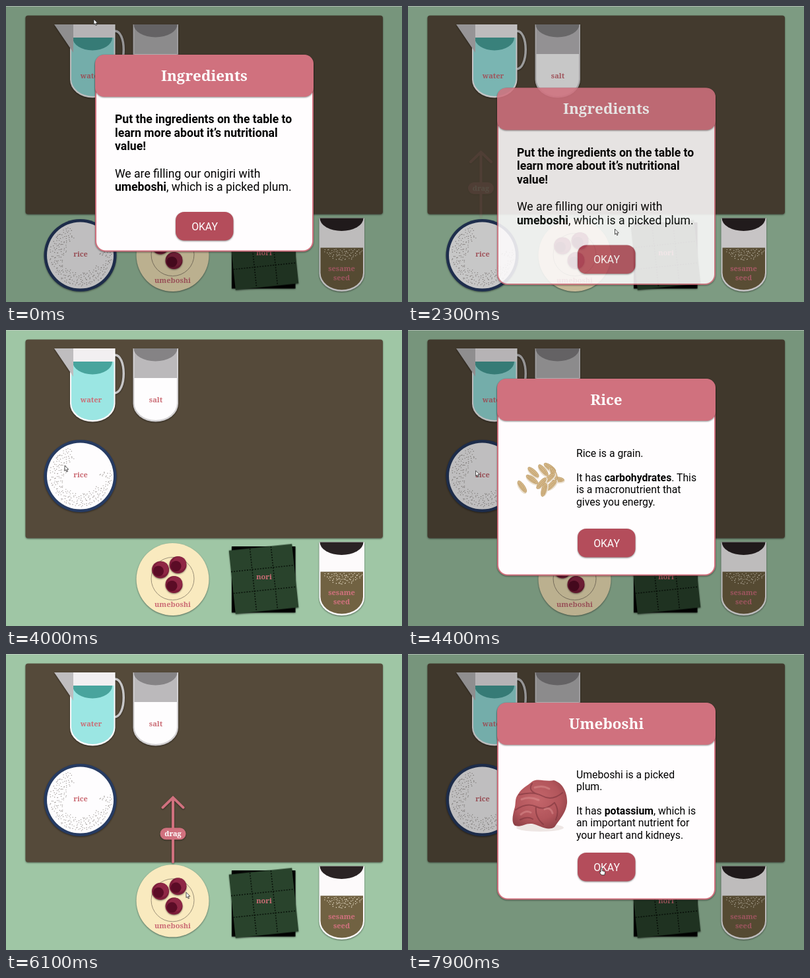
These frames come from a looping animation (600x450 px, 8 s). An HTML page:

```html
<!DOCTYPE html>
<html lang="en">
<head>
<meta charset="utf-8">
<title>Onigiri ingredients</title>
<style>
html, body { margin: 0; width: 100%; height: 100%; overflow: hidden; background: #9fc6a5; }
svg { display: block; width: 600px; height: 450px; }
text { font-family: Roboto, sans-serif; white-space: pre; }
.label { font: bold 11px "Noto Serif", serif; text-anchor: middle; fill: #cb6c75; }
.title { font: bold 22.4px "Noto Serif", serif; text-anchor: middle; fill: #fff; }
.okay { font-size: 15.75px; text-anchor: middle; fill: #fff; }
.shadow { filter: drop-shadow(0 1.5px 1px #0007); }
.bold { font-weight: bold; }
</style>
</head>
<body>
<svg id="stage" viewBox="0 0 600 450"></svg>
<script>
const LOOP = 8000, ROSE = '#d0717e', LIFT = 157;

let seed = 7;
const rand = () => (seed = seed * 16807 % 2147483647) / 2147483647;

const label = (x, y, s, fill = '') =>
  `<text class="label" x="${x}" y="${y}" ${fill && `style="fill:${fill}"`}>${s}</text>`;

// Jittered grid of specks, kept where inside(x, y) holds
function specks(x0, y0, x1, y1, step, color, inside) {
  let d = '';
  for (let y = y0; y < y1; y += step)
    for (let x = x0; x < x1; x += step) {
      const px = x + rand() * step, py = y + rand() * step;
      if (inside(px, py)) d += `M${px.toFixed(1)} ${py.toFixed(1)}h1.3`;
    }
  return `<path d="${d}" stroke="${color}" stroke-width="1.1"/>`;
}

// Round-bottomed glass: upper part, content from `level` down, surface ellipse
function glass(x, y, o) {
  return `<g class="shadow" transform="translate(${x} ${y})">${o.back || ''}
    <path d="M0 0H68.5V84A34.25 27.5 0 0 1 0 84Z" fill="${o.rim}"/>
    <path d="M2 0H66.5V${o.level}H2Z" fill="${o.top}"/>
    <path d="M2 ${o.level}H66.5V83A32.25 26 0 0 1 2 83Z" fill="${o.fill}"/>
    <path d="M${o.inset} ${o.surfaceY}H${68 - o.inset}A${34 - o.inset} 19.5 0 0 1 ${o.inset} ${o.surfaceY}Z" fill="${o.surface}"/>
    ${o.front || ''}</g>`;
}

const arrow = (id, x) => `<g id="${id}" class="shadow" transform="translate(${x} 0)">
  <path d="M0 320V223M-15.5 237L0 222L15.5 237" fill="none" stroke="${ROSE}" stroke-width="4" stroke-linecap="round"/>
  <rect x="-19.5" y="268" width="39" height="18" rx="9" fill="${ROSE}"/>${label(0, 280.5, 'drag', '#fff')}</g>`;

const plum = (x, y) => `<g class="shadow"><circle cx="${x}" cy="${y}" r="13" fill="#7d1d3a"/>
  <circle cx="${x + 2}" cy="${y - 2}" r="10.5" fill="#8f2745"/><circle cx="${x - 3}" cy="${y + 2}" r="8" fill="#5b0c26"/></g>`;

const riceSpecks = specks(-50, -50, 50, 50, 3.7, '#a39e9b', (x, y) => {
  const r = Math.hypot(x, y), a = (Math.atan2(y, x) * 180 / Math.PI + 360) % 360;
  const inner = a < 30 ? 36 : a > 175 && a < 215 ? 22 : 27;
  return r > inner && r < 47 && (a < 250 || a > 350);
});

const rice = `<g id="rice"><g class="shadow"><circle cx="112.5" cy="379" r="55" fill="#263b62"/>
  <circle cx="112.5" cy="379" r="50.5" fill="#fefdfe"/></g>
  <g transform="translate(112.5 379)">${riceSpecks}</g>${label(113, 381, 'rice')}${arrow('riceArrow', 110.5)}</g>`;

const umeboshi = `<g id="ume"><g class="shadow"><circle cx="252.5" cy="379" r="55" fill="#f9eabf"/></g>
  <circle cx="252.5" cy="378" r="32.5" fill="none" stroke="#9c9078"/>
  ${plum(234, 364.5)}${plum(260.5, 357)}${plum(254.5, 387)}${label(252.5, 421, 'umeboshi')}${arrow('umeArrow', 253)}</g>`;

const nori = `<rect x="342" y="329" width="96.5" height="100.5" class="shadow"/>
  <g transform="translate(390.5 378.5) rotate(-6)"><rect x="-48" y="-48.5" width="96" height="97" fill="#29432c" class="shadow"/>
  <path d="M-48 -16H48M-48 17H48M-16 -48V48M16 -48V48" stroke="#0a140b" stroke-width="1.6" stroke-dasharray="2 2"/></g>
  ${label(391, 379, 'nori')}`;

const water = glass(97, 28, {
  rim: '#fbfafb', top: '#f2eff1', fill: '#9be6e3', level: 20, surface: '#48a49d', surfaceY: 20, inset: 4,
  back: '<path d="M67 10C86 8 86 68 67 68" fill="none" stroke="#c6c5c6" stroke-width="3.5"/>',
  front: '<path d="M-24 0H5V43Z" fill="#bfbdbf"/>' + label(32, 81.5, 'water')
});
const salt = glass(192.5, 28, {
  rim: '#d2d0d2', top: '#bbb9bb', fill: '#fefdfe', level: 45, surface: '#858385', surfaceY: 0, inset: 1,
  front: label(34.5, 81.5, 'salt')
});
const sesame = glass(474.5, 322.5, {
  rim: '#fbfafb', top: '#fdfafb', fill: '#716242', level: 45, surface: '#2a2324', surfaceY: 0, inset: 1,
  front: specks(7, 47, 63, 65, 3.2, '#e6dcc6', (x, y) => y < 52 + 13 * (1 - ((x - 36) / 29) ** 2)) +
    label(34, 80, 'sesame', ROSE) + label(34, 94.5, 'seed', ROSE)
});

// Lines are [x, y, text]; *stars* mark bold
const lines = (size, rows) => rows.map(([x, y, s]) => `<text x="${x}" y="${y}" font-size="${size}">` +
  s.replace(/\*(.+?)\*/g, '<tspan class="bold">$1</tspan>') + '</text>').join('');

const modal = (id, title, buttonY, body) => `<g id="${id}">
  <g class="shadow"><rect x="136" y="75" width="329" height="297.5" rx="15" fill="#fffdfe" stroke="${ROSE}" stroke-width="2"/></g>
  <rect class="shadow" x="135" y="74" width="331" height="64" rx="14" fill="${ROSE}"/>
  <text class="title" x="300.5" y="113.5">${title}</text>${body}
  <rect class="shadow" x="257" y="${buttonY}" width="87.5" height="43.5" rx="13" fill="#b44d5b"/>
  <text class="okay" x="301" y="${buttonY + 27.5}">OKAY</text></g>`;

const grains = [[173, 238, 55], [190, 216, 42], [188, 227, 35], [205, 213, 50], [215, 209, 35], [226, 227, 5],
  [221, 218, 65], [214, 225, -40], [202, 233, -50], [217, 236, -45], [206, 243, -75]]
  .map(([x, y, a]) => `<g transform="translate(${x} ${y}) rotate(${a})"><ellipse cx="1" cy="1.5" rx="11" ry="4.5" fill="#eadfce"/>
    <ellipse rx="10.5" ry="3.6" fill="#d6b98a" stroke="#b8945e" stroke-width=".7"/>
    <path d="M-8 -.5Q0 -2 8 0M-7 1.5H7" fill="none" stroke="#b3905c" stroke-width=".6"/></g>`).join('');

const pickle = `<ellipse cx="200" cy="264" rx="36" ry="6" fill="#eee6e4"/>
  <path d="M188 194C197 188 209 195 221 192C235 196 242 212 241 227C239 243 229 252 222 263C211 270 199 260 188 258C177 257 171 264 162 261C156 256 159 244 161 236C164 229 161 220 167 213C172 204 180 201 188 194Z" fill="url(#flesh)"/>
  <g fill="none" stroke="#7c343c" stroke-width="2" opacity=".6" stroke-linecap="round">
  <path d="M168 214Q190 208 204 216T234 211M163 237Q180 225 194 232T222 226M194 232Q192 248 205 259M222 226Q230 238 224 252M188 197Q181 208 196 213M170 252Q181 246 189 251"/></g>
  <g fill="none" stroke="#df9797" stroke-width="3" opacity=".45" stroke-linecap="round"><path d="M192 203Q204 199 214 205M172 221Q184 216 198 222M207 236Q216 232 219 242M171 244Q179 237 186 241"/></g>`;

document.getElementById('stage').innerHTML = `
  <defs><radialGradient id="flesh" cx=".45" cy=".4" r=".65">
    <stop offset="0" stop-color="#c4666b"/><stop offset=".65" stop-color="#b2555b"/><stop offset="1" stop-color="#8f4147"/>
  </radialGradient></defs>
  <rect width="600" height="450" fill="#9fc6a5"/>
  <rect class="shadow" x="29.5" y="14.5" width="541.5" height="302" rx="4" fill="#554a3a"/>
  ${water}${salt}${nori}${sesame}${rice}${umeboshi}
  <rect id="shade" width="600" height="450"/>
  <path d="M0 .5H600" stroke="#d4d8d5" opacity=".6"/>
  ${modal('intro', 'Ingredients', 313, lines(17.6, [
    [165, 178, '*Put the ingredients on the table to*'], [165, 198.5, '*learn more about it’s nutritional*'],
    [165, 219, '*value!*'], [165, 260.5, 'We are filling our onigiri with'],
    [165, 281, '*umeboshi*, which is a picked plum.']]))}
  ${modal('riceInfo', 'Rice', 302, grains + lines(15.75, [
    [255, 192.5, 'Rice is a grain.'], [255, 229.5, 'It has *carbohydrates*. This'],
    [255, 248, 'is a macronutrient that'], [255, 266.5, 'gives you energy.']]))}
  ${modal('umeInfo', 'Umeboshi', 302, pickle + lines(15.75, [
    [255, 188.5, 'Umeboshi is a picked'], [255, 207, 'plum.'], [255, 243.5, 'It has *potassium*, which is'],
    [255, 262, 'an important nutrient for'], [255, 280.5, 'your heart and kidneys.']]))}
  <g id="cursor" fill="#fff" stroke="#222" stroke-width=".8" stroke-linejoin="round">
    <path id="pointer" d="M0 0V8.2L1.8 6.6L3.2 9.6L4.5 9L3.2 6H5.8Z"/>
    <path id="hand" d="M0 .8Q1 -.4 2 .8V4.5L6 5.5Q7 6 6.5 8L5.8 11H1.2L-2 7Q-1.8 5.6 0 6.6Z"/>
  </g>`;

const $ = id => document.getElementById(id);
const ramp = (t, start, length) => Math.min(1, Math.max(0, (t - start) / length));
const smooth = p => p * p * (3 - 2 * p);
const slideIn = (t, start) => 1 - (1 - ramp(t, start, 300)) ** 3;
const slideOut = (t, start) => smooth(ramp(t, start, 300));

const path = [[0, 133, 20], [900, 335, 345], [1000, 335, 345], [1300, 313.5, 339], [2300, 313.5, 339],
  [3000, 89, 363], [3250, 89, 363], [3900, 89, 206], [4250, 89, 206], [5200, 290, 322], [5520, 289, 321],
  [5980, 273, 366], [6060, 273, 366], [6510, 273, 209], [6700, 253, 219], [6800, 253, 219], [7650, 292, 325], [8000, 292, 325]];

function cursorAt(t) {
  const i = path.findIndex(k => k[0] > t), [t0, x0, y0] = path[i - 1], [t1, x1, y1] = path[i];
  const p = smooth((t - t0) / (t1 - t0));
  return [x0 + (x1 - x0) * p, y0 + (y1 - y0) * p];
}

const modals = [['intro', -1000, 2232], ['riceInfo', 4100, 5480], ['umeInfo', 6599, 9000]];
const drags = [['rice', 2232, 3250, 650], ['ume', 5480, 6060, 450]];
const onButton = [[850, 2232], [5150, 5480], [7500, 8000]];

function draw(t) {
  let shade = 0;
  for (const [id, enter, leave] of modals) {
    const shown = slideIn(t, enter), gone = slideOut(t, leave), alpha = shown * (1 - gone);
    $(id).setAttribute('transform', `translate(0 ${-374 * (1 - shown) + 376 * gone})`);
    $(id).setAttribute('opacity', alpha);
    shade += alpha;
  }
  $('shade').setAttribute('opacity', .25 * shade);

  for (const [id, hint, start, length] of drags) {
    $(id).setAttribute('transform', `translate(0 ${-LIFT * smooth(ramp(t, start, length))})`);
    $(id + 'Arrow').setAttribute('opacity', slideOut(t, hint) * (1 - ramp(t, start + 50, 100)));
  }

  const [x, y] = cursorAt(t), hand = onButton.some(([a, b]) => t >= a && t < b);
  $('cursor').setAttribute('transform', `translate(${x} ${y})`);
  $('hand').setAttribute('visibility', hand ? 'visible' : 'hidden');
  $('pointer').setAttribute('visibility', hand ? 'hidden' : 'visible');
}

const begin = performance.now();
function tick() {
  draw((performance.now() - begin) % LOOP);
  requestAnimationFrame(tick);
}
tick();
</script>
</body>
</html>
```
